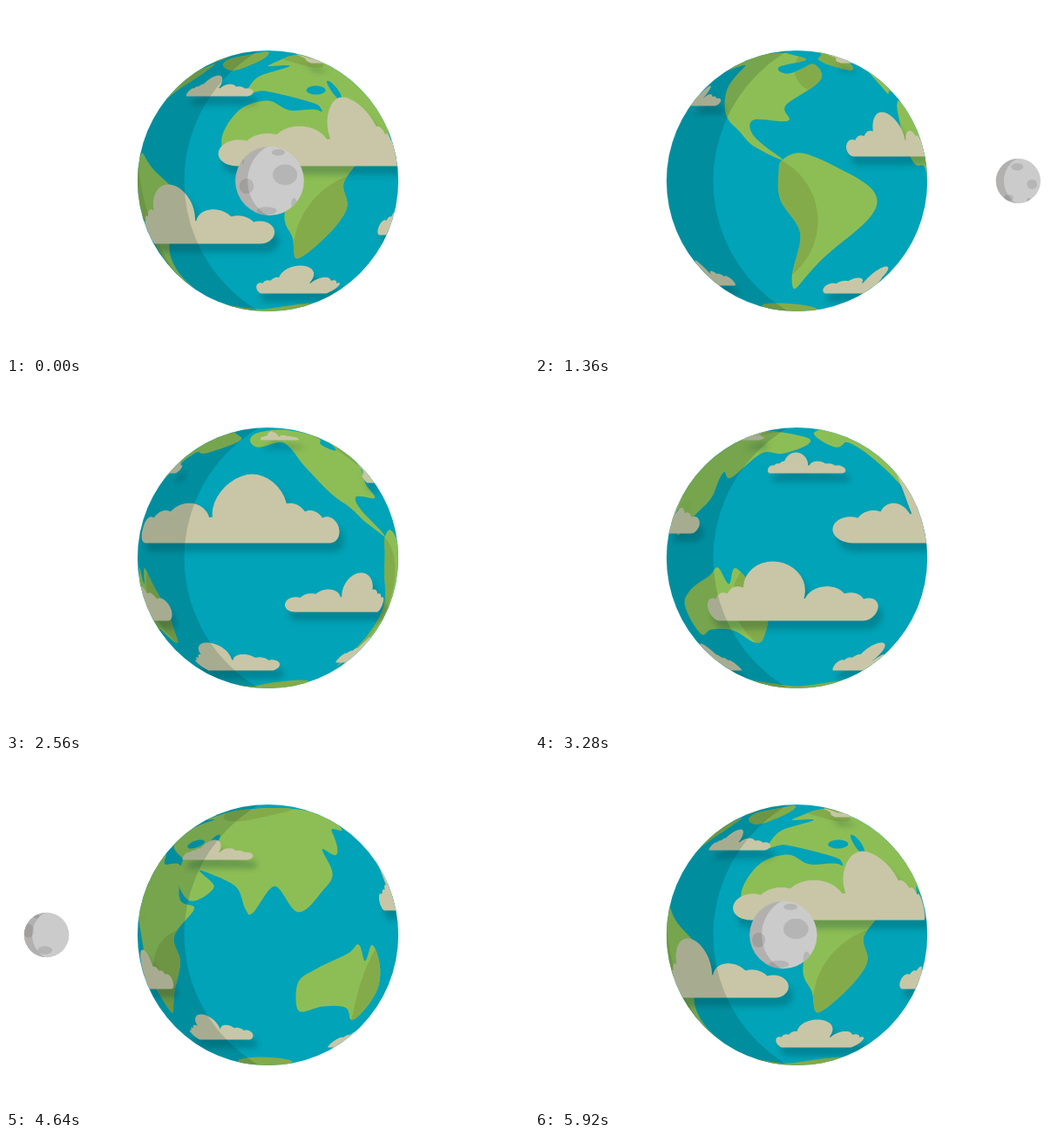
An HTML page with a canvas for the animation above (6000 ms loop, 600 px wide and 400 px high).

```html
<!DOCTYPE html>
<html lang="en">
<head>
<meta charset="utf-8">
<title>Earth and Moon</title>
<style>
html, body { margin: 0; width: 100%; height: 100%; overflow: hidden; background: #fff; }
canvas { display: block; }
</style>
</head>
<body>
<canvas id="stage" width="600" height="400"></canvas>
<script>
const ctx = document.getElementById('stage').getContext('2d');
const LOOP = 6000, CX = 300.5, CY = 200.5, R = 149.6, RAD = Math.PI / 180;
const SPIN = 0.06, CLOUD_SPIN = 0.13375, CLOUD_PERIOD = 399.5;
const SEA = '#00a3b7', LAND = '#8dbe55', DARK = '#84ab49', CLOUD = '#c8c6a6';

const sin = deg => Math.sin(deg * RAD), cos = deg => Math.cos(deg * RAD);
const clamp = (v, lo, hi) => Math.max(lo, Math.min(hi, v));
const wrap = (v, period) => v - period * Math.round(v / period);
const ring = h => Math.sqrt(Math.max(0, R * R - h * h));

// Points seen on a globe turned by rot -> [longitude, height]
function trace(rot, ...xy) {
  const pts = [];
  for (let i = 0; i < xy.length; i += 2) {
    const h = xy[i + 1] - 200;
    pts.push([Math.asin(clamp((xy[i] - 300) / (ring(h) || 1), -1, 1)) / RAD - rot, h]);
  }
  return pts;
}

function oval(x, y, rx, ry) {
  return Array.from({ length: 36 }, (_, i) => [x + rx * cos(i * 10), y + ry * sin(i * 10)]);
}

const spot = (rot, x, y, rx, ry = rx) => shape(trace(rot, ...oval(x, y, rx, ry).flat()));

// Closed Catmull-Rom curve
function smooth(pts) {
  const n = pts.length, out = [];
  for (let i = 0; i < n; i++) {
    const [a, b, c, d] = [-1, 0, 1, 2].map(k => pts[(i + k + n) % n]);
    for (let u = 0; u < 1; u += 0.125) {
      out.push([0, 1].map(k => b[k] + u / 2 * (c[k] - a[k] +
        u * (2 * a[k] - 5 * b[k] + 4 * c[k] - d[k] + u * (3 * (b[k] - c[k]) + d[k] - a[k])))));
    }
  }
  return out;
}

function shape(...rings) {
  const lons = rings.flat().map(p => p[0]);
  return { rings, mid: (Math.min(...lons) + Math.max(...lons)) / 2 };
}

const land = (dark, ...coast) => ({ body: shape(smooth(coast.flat())), dark });

function project({ rings, mid }, rot, period) {
  const shift = wrap(mid + rot, period) - mid, path = new Path2D();
  for (const pts of rings) {
    for (const [i, [lon, h]] of pts.entries()) {
      const x = CX + ring(h) * sin(clamp(lon + shift, -90, 90));
      path[i ? 'lineTo' : 'moveTo'](x, CY + h);
    }
    path.closePath();
  }
  return path;
}

// One dome with bumps that shrink towards both ends
function cloud(peak, base, height, left, right) {
  const floor = base - 200, rings = [], spine = [];
  for (const u of [-0.87, -0.68, -0.46, 0, 0.46, 0.68, 0.87]) {
    const d = Math.abs(u), side = u < 0 ? left : right;
    const half = height * (u ? 0.8 - 0.48 * d : 1) / 2;
    const width = u ? side * (0.27 - 0.16 * d) : 0.16 * (left + right);
    const lon = peak + u * side;
    rings.push(oval(lon, floor - half, width, half));
    spine.push([lon, floor - half]);
  }
  const bottom = spine.map(([lon]) => [lon, floor]).reverse();
  return shape(...rings, [...spine, ...bottom]);
}

const southAmerica = land(spot(81.6, 245, 246, 79),
  trace(81.6, 283,176, 305,168, 345,184, 388,212, 385,240, 335,284, 300,322, 294,312, 304,262, 281,222, 279,190));

const northAmerica = land(spot(81.6, 322, 72, 25),
  trace(153.6, 287,57, 287,73, 318,68, 342,95, 372,126, 395,143),
  trace(81.6, 250,160, 284,176, 250,148, 250,130, 290,131, 288,112, 328,82, 318,66, 290,77, 280,69, 310,60, 285,53));

const greenland = land(spot(43.2, 310, 62, 40), trace(43.2, 290,60, 315,52, 331,66, 314,73));

const africa = land(spot(0, 425, 285, 97),
  trace(0, 247,150, 268,118, 300,108, 325,119, 362,121),
  trace(-43.2, 285,160, 308,170, 280,202, 287,232, 266,266, 245,289),
  trace(0, 328,265, 319,245, 319,210, 295,184, 258,180));

const eurasia = land(spot(-43.2, 310, 48, 40, 22),
  trace(0, 276,100, 290,80, 325,68, 300,68, 325,57),
  trace(-120, 300,55, 350,63, 350,80, 325,80, 307,108, 290,102, 290,130, 270,150, 238,174, 220,144),
  trace(-43.2, 377,175, 369,170, 352,143, 303,126, 329,145, 300,161, 268,130, 270,118),
  trace(0, 350,110, 297,97));

const australia = land(spot(-120, 395, 262, 68),
  trace(-120, 243,255, 262,238, 300,221, 315,211, 328,230, 340,212, 366,258, 350,290, 335,297, 315,283, 282,282, 255,287));

const lands = [southAmerica, northAmerica, greenland, africa, eurasia, australia];
const lakes = [spot(0, 355, 96, 11, 5), spot(-43.2, 304, 96, 6, 11)];

// Peak longitude, base line, height, reach to the left and right
const clouds = [
  cloud(48, 183, 79, 71, 43),
  cloud(-132, 172, 51, 27, 42),
  cloud(-50, 272, 68, 37, 53),
  cloud(103, 262, 45, 38, 24),
  cloud(19, 329, 32, 28, 47),
  cloud(-117, 329, 31, 44, 24),
  cloud(138, 320, 29, 23, 30),
  cloud(-40, 103, 24, 17, 31),
  cloud(142, 114, 23, 18, 28),
  cloud(-110, 65, 10, 22, 31),
  cloud(63, 65, 10, 14, 29)
];

// Longitude, height and size on a unit moon
const craters = [[27, -0.18, 0.4], [-43, 0.15, 0.29], [-85, -0.63, 0.27],
  [-10, 0.87, 0.3], [-122, 0.75, 0.28], [27, -0.83, 0.22], [76, 0.68, 0.33]];

function disc(x, y, r) {
  const p = new Path2D();
  p.arc(x, y, r, 0, 7);
  return p;
}

function fill(path, colour) {
  ctx.fillStyle = colour;
  ctx.fill(path);
}

function inside(path, draw) {
  ctx.save();
  ctx.clip(path);
  draw();
  ctx.restore();
}

// Crescent on the left side of a ball
function shade(x, y, r, colour) {
  const p = new Path2D();
  p.rect(x - 2 * r, y - 2 * r, 4 * r, 4 * r);
  p.addPath(disc(x + 0.512 * r, y, 1.154 * r));
  ctx.fillStyle = colour;
  ctx.fill(p, 'evenodd');
}

function southIce(rot) {
  const p = new Path2D();
  for (let d = -90; d <= 90; d += 5) {
    const h = 143.5 - 3.5 * cos(2 * (d - rot - 73));
    p.lineTo(CX + ring(h) * sin(d), CY + h);
  }
  p.lineTo(CX + 40, CY + R);
  p.lineTo(CX - 40, CY + R);
  fill(p, DARK);
}

function drawEarth(t) {
  const rot = SPIN * t, globe = disc(CX, CY, R);
  fill(globe, SEA);
  inside(globe, () => {
    for (const { body, dark } of lands) {
      const path = project(body, rot, 360);
      fill(path, LAND);
      inside(path, () => fill(project(dark, rot, 360), DARK));
    }
    for (const lake of lakes) fill(project(lake, rot, 360), SEA);
    southIce(rot);
    ctx.save();
    ctx.shadowColor = 'rgba(0,50,55,.25)';
    ctx.shadowBlur = 6;
    ctx.shadowOffsetX = 5;
    ctx.shadowOffsetY = 10;
    for (const c of clouds) fill(project(c, CLOUD_SPIN * t, CLOUD_PERIOD), CLOUD);
    ctx.restore();
    shade(CX, CY, R, 'rgba(0,40,40,.165)');
  });
}

function drawMoon(t, x, r) {
  const ball = disc(x, CY, r);
  fill(ball, '#cbcbcb');
  inside(ball, () => {
    for (const [lon, h, size] of craters) {
      const d = lon + SPIN * t, lat = Math.sqrt(1 - h * h);
      if (cos(d) <= 0) continue;
      const p = new Path2D();
      p.ellipse(x + r * lat * sin(d), CY + r * h, r * size * cos(d), r * size * lat * 0.77, 0, 0, 7);
      fill(p, '#b5b5b5');
    }
    shade(x, CY, r, 'rgba(30,25,20,.14)');
  });
}

function draw(now) {
  const t = now % LOOP;
  // The moon lingers in front and hurries behind
  const s = wrap(t + 8, LOOP), age = Math.abs(s), phase = SPIN * s;
  const x = CX + 254 * sin(phase + 13 * sin(phase) - 11.5 * sin(2 * phase));
  const r = 39.5 - 0.0115 * age + 1e-6 * age * age;
  const behind = age > LOOP / 4;
  ctx.fillStyle = '#fff';
  ctx.fillRect(0, 0, 600, 400);
  if (behind) drawMoon(t, x, r);
  drawEarth(t);
  if (!behind) drawMoon(t, x, r);
}

const start = performance.now();
function frame() {
  draw(performance.now() - start);
  requestAnimationFrame(frame);
}
frame();
</script>
</body>
</html>
```
